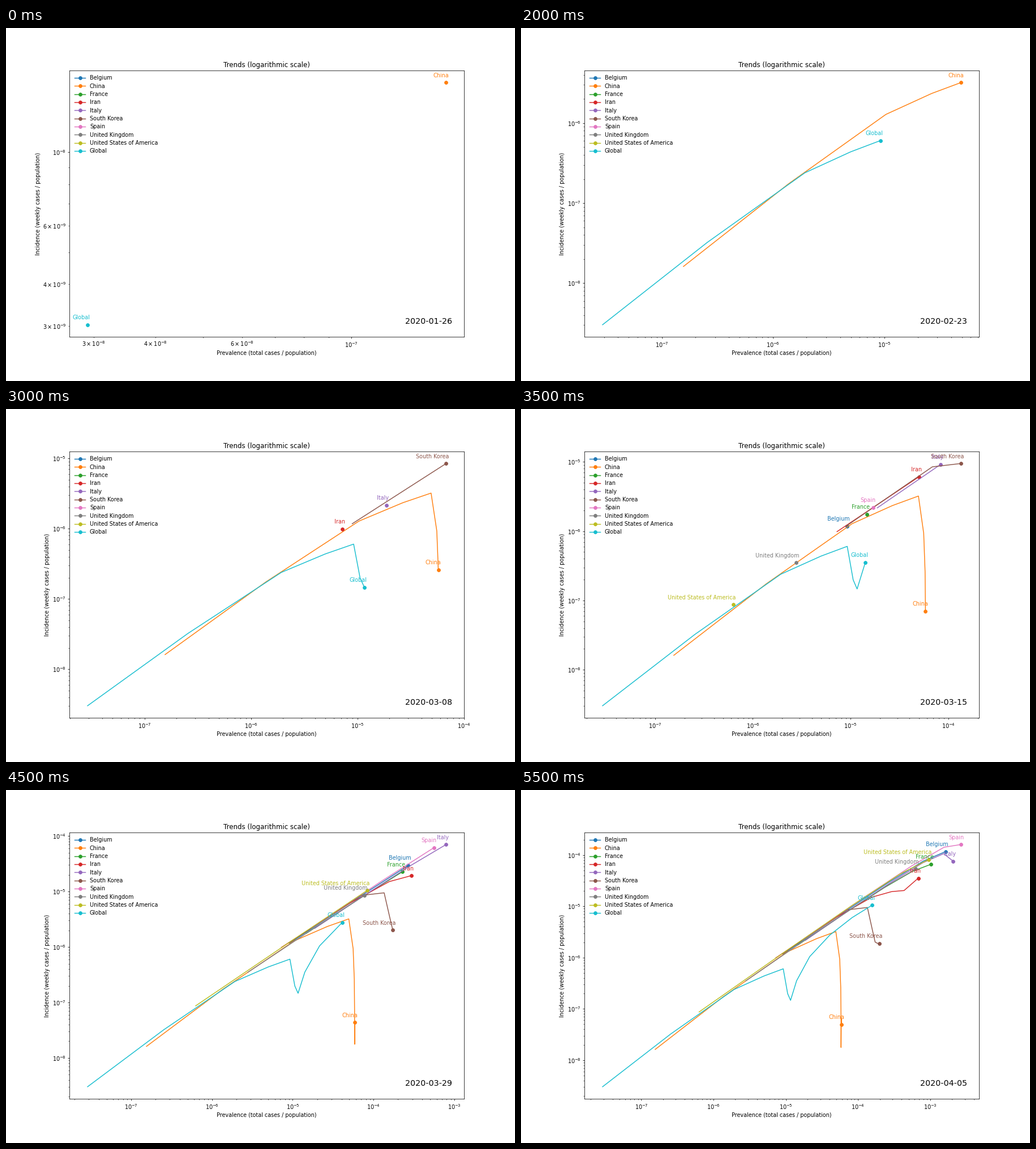
A matplotlib script that plays this animation: 899 px wide and 623 px high, repeating every 7.5 s.

```python
import matplotlib.pyplot as plt
import numpy as np
from matplotlib.animation import FuncAnimation

WIDTH, HEIGHT, DPI = 899, 623, 69.2
LAST_WEEK, HOLD = 11, 3
CHINA_SHARE = 0.186  # of the world population

plt.rcParams["font.family"] = "DejaVu Sans"


# All curves give total cases per million people for an array of weeks.

def sigmoid(z):
    return 1 / (1 + np.exp(-z))


def growth(weeks, totals):
    """Slowing exponential growth through a few key points."""
    coeffs = np.polyfit(weeks, np.log(totals), len(weeks) - 1)
    return lambda t: np.exp(np.polyval(coeffs, t))


def china(t):
    """A saturated first wave followed by a small second one."""
    logit = np.interp(t, [-1, 0, 2, 3, 4, 7],
                      [-7.22, -5.92, -1.53, -0.16, 1.71, 6])
    return 58.15 * sigmoid(logit) + 1.51 * sigmoid((t - 9.6) / 0.8)


def south_korea(t):
    """One steep wave that ends in a steady trickle."""
    return 146 * sigmoid(2.6 * (t - 6.05)) + 13.2 * np.maximum(0, t - 7)


rest_of_world = growth([5, 7, 9, 11], [0.236, 3.3, 29.8, 145.6])


def world(t):
    return CHINA_SHARE * china(t) + rest_of_world(t)


EARLY, LATE = [6, 8, 10, 11], [8, 10, 11]

# name: (first week shown, curve)
CURVES = {
    "Belgium": (7, growth(LATE, [60.3, 800, 1614])),
    "China": (0, china),
    "France": (7, growth(LATE, [67.1, 561, 1024])),
    "Iran": (6, growth(EARLY, [7.25, 155.6, 433, 681])),
    "Italy": (6, growth(EARLY, [18.7, 293, 1531, 2063])),
    "South Korea": (5, south_korea),
    "Spain": (7, growth(LATE, [123, 1547, 2671])),
    "United Kingdom": (7, growth(LATE, [17.1, 257, 630])),
    "United States of America": (7, growth(LATE, [9.8, 381, 954])),
    "Global": (0, world),
}

fig, ax = plt.subplots(
    figsize=((WIDTH + 0.001) / DPI, (HEIGHT + 0.001) / DPI), dpi=DPI)
fig.subplots_adjust(left=0.125, right=0.9, bottom=0.125, top=0.88)


def trend(start, curve, week):
    """Prevalence and mean daily incidence from the start week on."""
    if week < start:
        return [], []
    rate = curve(np.arange(start - 1, week + 1)) / 1e6
    return rate[1:], np.diff(rate) / 7


def draw(frame):
    week = min(frame, LAST_WEEK)
    ax.clear()
    for k, (name, (start, curve)) in enumerate(CURVES.items()):
        x, y = trend(start, curve, week)
        color = f"C{k}"
        ax.loglog(x, y, "o-", color=color, label=name,
                  markevery=[-1] if len(x) else None)
        if len(x):
            ax.annotate(name, (x[-1], y[-1]), xytext=(5, 10),
                        textcoords="offset points", ha="right", color=color)

    date = np.datetime64("2020-01-26") + 7 * min(week, LAST_WEEK - 1)
    ax.text(0.97, 0.05, str(date), transform=ax.transAxes, ha="right",
            size=14.85)
    ax.set_title("Trends (logarithmic scale)", size=12.2)
    ax.set_xlabel("Prevalence (total cases / population)")
    ax.set_ylabel("Incidence (weekly cases / population)")
    ax.legend(loc="upper left", frameon=False, labelspacing=0.45)


anim = FuncAnimation(fig, draw, frames=LAST_WEEK + 1 + HOLD, interval=500,
                     init_func=lambda: None, repeat=True, repeat_delay=0)
plt.show()
```
